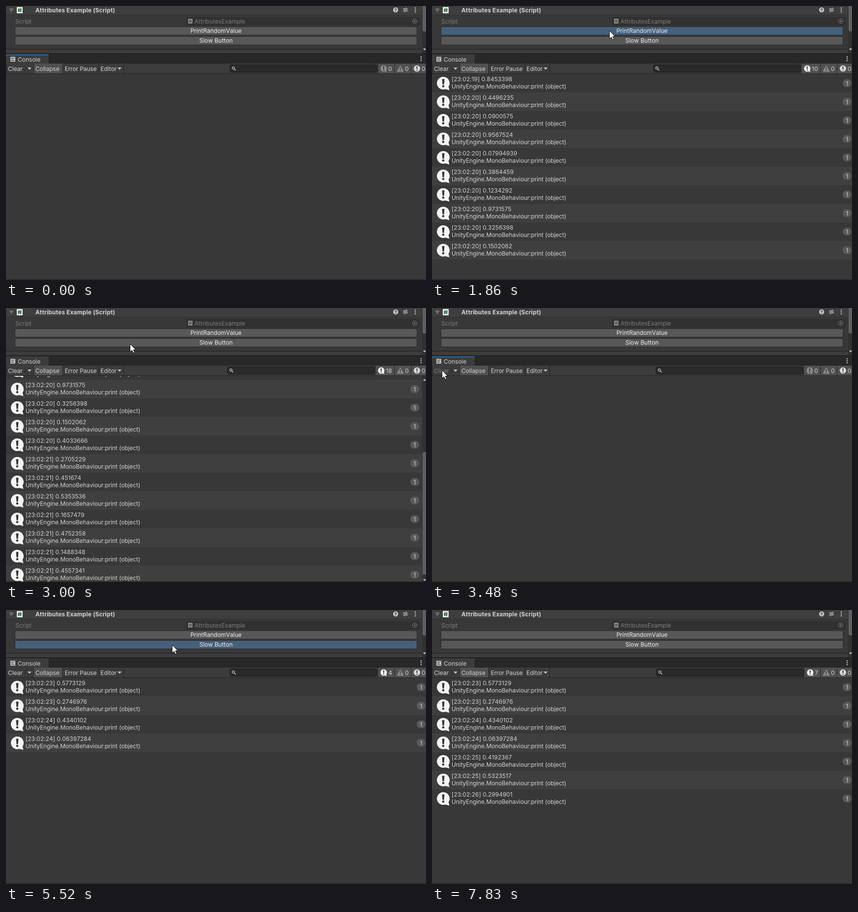
An HTML page for the animation above (8.22 s loop, 858 px wide and 561 px high).

```html
<!DOCTYPE html>
<html lang="en">
<head>
<meta charset="utf-8">
<title>Console buttons</title>
<style>
html, body { margin: 0; width: 100%; height: 100%; overflow: hidden; background: #383838; }
svg { display: block; width: 858px; height: 561px; }
text {
  font: 12px Inter, "Liberation Sans", sans-serif; fill: #d2d2d2; white-space: pre;
  font-kerning: none; font-variant-ligatures: none;
}
.mid { text-anchor: middle; }
.dim { fill: #7e7e7e; }
.bold { font-weight: 700; letter-spacing: .14px; }
.tight { letter-spacing: -.09px; }
.btn rect { fill: #585858; stroke: #2b2b2b; }
.btn.on rect { fill: #46607c; }
.btn text { fill: #eee; }
.line { fill: #232323; }
.toggle { fill: #505050; }
.icon { fill: #c4c4c4; }
</style>
</head>
<body>
<svg viewBox="0 0 858 561">
  <defs>
    <g id="bubble">
      <path d="M13 0A13 13 0 1 0 17.500 25.200L25.500 27.500 23.800 20.300A13 13 0 0 0 13 0Z"/>
      <path d="M10.500 4.500h5l-1 11.200h-3z" fill="#333"/>
      <circle cx="13" cy="19.300" r="2.300" fill="#333"/>
    </g>
    <g id="dots"><circle r="1.300"/><circle cy="-4" r="1.300"/><circle cy="4" r="1.300"/></g>
    <path id="down" d="M-4 0h8l-4 4.500z"/>
    <path id="hash" d="M-1-4L-2.500 4M2.500-4L1 4M-4-1.500H4M-4 1.500H4" fill="none"/>
  </defs>

  <rect width="858" height="561" fill="#383838"/>
  <g id="rows"></g>
  <g id="bar">
    <rect x="850" y="139" width="8" height="422" fill="#313131"/>
    <rect id="thumb" x="851" width="9" rx="3" fill="#5f5f5f"/>
    <path d="M852 149h6l-3-4z" class="icon"/>
    <path d="M852 555h6l-3 4z" class="icon"/>
  </g>
  <rect y="560" width="858" height="1" class="line"/>

  <!-- inspector -->
  <rect width="858" height="98" fill="#383838"/>
  <rect width="850" height="18" fill="#3e3e3e"/>
  <rect y="18" width="850" height="1" fill="#303030"/>
  <path d="M6 5h10l-5 8z" fill="#6c6c6c"/>
  <rect x="22" y="2" width="12" height="13" rx="1" fill="#eee"/>
  <use href="#hash" x="28" y="8.500" stroke="#1f6436" stroke-width="1.500"/>
  <text x="60" y="13" class="bold">Attributes Example (Script)</text>
  <circle cx="796" cy="8" r="5.200" class="icon"/>
  <text x="796" y="11.500" class="mid bold" style="font-size:9px;fill:#383838">?</text>
  <path d="M811 6h5M819 6h2M811 10h2M816 10h5M817.500 3v6M814.500 7v6" stroke="#c4c4c4" stroke-width="1.400"/>
  <use href="#dots" x="836" y="8" class="icon"/>
  <text x="19" y="36" class="dim">Script</text>
  <rect x="368.500" y="23.500" width="476" height="16" rx="2" fill="#313131" stroke="#2d2d2d"/>
  <rect x="372" y="26" width="9" height="10" rx="1" fill="#8b8b8b"/>
  <use href="#hash" transform="translate(376.500 31) scale(.75)" stroke="#3c3c3c"/>
  <text x="385" y="36" class="dim">AttributesExample</text>
  <circle cx="835" cy="31" r="4.500" fill="none" stroke="#858585"/>
  <circle cx="835" cy="31" r="1.600" fill="#858585"/>
  <g id="fast" class="btn">
    <rect x="18.500" y="42.500" width="821" height="17" rx="2.500"/>
    <text x="429" y="55" class="mid">PrintRandomValue</text>
  </g>
  <g id="slow" class="btn">
    <rect x="18.500" y="62.500" width="821" height="17" rx="2.500"/>
    <text x="429" y="75" class="mid">Slow Button</text>
  </g>
  <rect y="88" width="850" height="1" fill="#1f1f1f"/>
  <rect y="89" width="850" height="8" fill="#3c3c3c"/>
  <rect x="850" width="8" height="97" fill="#313131"/>
  <rect x="851" y="-5" width="9" height="57" rx="3" fill="#5f5f5f"/>
  <path d="M852 87h6l-3 4z" class="icon"/>
  <rect y="97" width="858" height="1" fill="#191919"/>

  <!-- console tab and toolbar -->
  <rect y="98" width="858" height="20" fill="#282828"/>
  <rect y="99" width="87" height="19" fill="#3c3c3c"/>
  <rect id="focus" y="99" width="87" height="2" fill="#2f6ca3"/>
  <rect x="9" y="104" width="10" height="10" rx="1" class="icon"/>
  <path d="M10.500 106.500h7M10.500 109h5M10.500 111.500h7" stroke="#3c3c3c"/>
  <text x="24" y="114">Console</text>
  <use href="#dots" x="848" y="108" class="icon"/>
  <rect y="118" width="858" height="20" fill="#3c3c3c"/>
  <rect x="57" y="118" width="58" height="20" class="toggle"/>
  <g class="line">
    <rect y="138" width="858" height="1"/>
    <rect y="118" width="1" height="20"/>
    <rect x="39" y="122" width="1" height="12"/>
    <rect x="56" y="118" width="1" height="20"/>
    <rect x="115" y="118" width="1" height="20"/>
    <rect x="189" y="118" width="1" height="20"/>
    <rect x="240" y="118" width="1" height="20"/>
  </g>
  <text id="clear" x="4" y="133">Clear</text>
  <use href="#down" x="48" y="126" class="icon"/>
  <text x="60" y="133">Collapse</text>
  <text x="120" y="133" class="tight">Error Pause</text>
  <text x="193" y="133">Editor</text>
  <use href="#down" x="232" y="126" class="icon"/>

  <g id="left">
    <rect x="457.500" y="120.500" width="300" height="15" rx="3" fill="#2a2a2a" stroke="#191919"/>
    <circle cx="464.500" cy="127" r="2.400" fill="none" stroke="#c4c4c4" stroke-width="1.200"/>
    <path d="M466.300 129l3 3" stroke="#c4c4c4" stroke-width="1.400"/>
    <rect x="760" y="118" width="44" height="20" class="toggle"/>
    <rect x="759" y="118" width="1" height="20" class="line"/>
    <use id="info" href="#bubble" transform="translate(765 121.500) scale(.5)"/>
    <text id="count" x="781" y="133">0</text>
  </g>
  <rect x="793" y="118" width="65" height="20" class="toggle"/>
  <rect x="793" y="118" width="1" height="20" class="line"/>
  <rect x="827" y="118" width="1" height="20" class="line"/>
  <path d="M805.500 122l6.500 12h-13z" fill="#8a8a8a" stroke="#8a8a8a" stroke-linejoin="round"/>
  <path d="M805.500 125v5M805.500 131v2" stroke="#444" stroke-width="1.800"/>
  <text x="815" y="133">0</text>
  <circle cx="839.500" cy="128" r="6.500" fill="#d8d8d8"/>
  <path d="M839.500 123.500v5.500M839.500 130.500v2" stroke="#383838" stroke-width="2"/>
  <text x="849" y="133">0</text>

  <path id="cursor" d="M.5.5V17L4.300 13.500 7 19.300 9.600 18.100 7.100 12.500H12Z" fill="#fff" stroke="#000" stroke-width=".9"/>
</svg>
<script>
const LOOP = 8220, STEP = 30, ROW = 38, TOP = 139, VIEW = 426;
const $ = id => document.getElementById(id);

const runs = [
  { from: 900, to: 3480,
    times: [900, 1080, 1260, 1470, 1650, 1860, 2040, 2250, 2430, 2640],
    counts: [1, 3, 5, 7, 9, 10, 12, 14, 16, 18],
    second: i => i ? (i < 11 ? 20 : 21) : 19,
    values: ('0.8453398 0.4496235 0.0900575 0.9567524 0.07994939 0.3864459 0.1234292 0.9731575 0.3256398 ' +
      '0.1502062 0.4033666 0.2705229 0.451674 0.5353536 0.1657479 0.4752358 0.1488348 0.4557341').split(' ') },
  { from: 4410, to: LOOP,
    times: [4410, 4560, 5130, 5520, 6090, 6480, 7050],
    counts: [1, 2, 3, 4, 5, 6, 7],
    second: i => 23 + (i >> 1),
    values: '0.5773129 0.2746976 0.4340102 0.06397284 0.4192367 0.5323517 0.2994901'.split(' ') }
];

const easeOut = u => u * (2 - u), easeIn = u => u * u, smooth = u => u * u * (3 - 2 * u);
// Each move: start and end time, start point, control point, end point, easing
const moves = [
  [90, 720, [850, 37], [606, 40], [362, 50], easeOut],
  [2820, 3300, [362, 50], [190, 85], [20, 127], smooth],
  [3510, 4110, [20, 127], [180, 52], [339, 71], smooth],
  [7380, 7830, [339, 71], [624, 49], [909, 27], easeIn]
];

function cursorAt(t) {
  if (t < 90 || t >= 7830) return null;
  const [a, b, p, c, q, ease] = moves.findLast(m => t >= m[0]);
  const s = ease(Math.min(1, (t - a) / (b - a))), r = 1 - s;
  return p.map((v, k) => Math.round(r * r * v + 2 * r * s * c[k] + s * s * q[k]));
}

function rowMarkup(run, i, scroll, right) {
  const y = TOP + i * ROW - scroll;
  if (y < TOP - ROW || y > 561) return '';
  return `<g transform="translate(0 ${y})">
    <rect width="858" height="${ROW}" fill="${i % 2 ? '#3f3f3f' : '#383838'}"/>
    <use href="#bubble" x="10" y="6" fill="#f4f4f4"/>
    <text x="40" y="15">[23:02:${run.second(i)}] ${run.values[i]}</text>
    <text x="40" y="30" class="tight">UnityEngine.MonoBehaviour:print (object)</text>
    <rect x="${right - 9}" y="11" width="18" height="16" rx="8" fill="#5a5a5a"/>
    <text x="${right}" y="23.500" class="mid">1</text></g>`;
}

const countWidth = () => Math.ceil($('count').getComputedTextLength());
const zeroWidth = countWidth();
let shown = '';

function showLog(run, n) {
  const key = n + '/' + (run ? run.from : 0);
  if (key === shown) return;
  shown = key;
  const total = n * ROW, scroll = Math.max(0, total - VIEW);
  let rows = '';
  for (let i = 0; i < n; i++) rows += rowMarkup(run, i, scroll, scroll ? 835 : 848);
  $('rows').innerHTML = rows;
  $('bar').style.display = scroll ? '' : 'none';
  if (scroll) {
    $('thumb').setAttribute('y', 143 + 403 * scroll / total);
    $('thumb').setAttribute('height', 403 * VIEW / total);
  }
  $('count').textContent = n;
  $('info').setAttribute('fill', n ? '#f4f4f4' : '#8a8a8a');
  $('left').setAttribute('transform', `translate(${zeroWidth - countWidth()} 0)`);
}

function draw(t) {
  const run = runs.find(r => t >= r.from && t < r.to);
  showLog(run, run ? run.counts[run.times.findLastIndex(x => t >= x)] : 0);
  $('fast').classList.toggle('on', t >= 900 && t < 2700);
  $('slow').classList.toggle('on', t >= 4410 && t < 7080);
  $('clear').classList.toggle('dim', t >= 3390 && t < 3540);
  $('focus').style.display = t < 900 || t >= 3390 && t < 4410 ? '' : 'none';
  const p = cursorAt(t);
  $('cursor').style.display = p ? '' : 'none';
  if (p) $('cursor').setAttribute('transform', `translate(${p})`);
}

const start = performance.now();
function tick() {
  const t = (performance.now() - start) % LOOP;
  draw(Math.floor(t / STEP) * STEP);
  requestAnimationFrame(tick);
}
tick();
</script>
</body>
</html>
```
